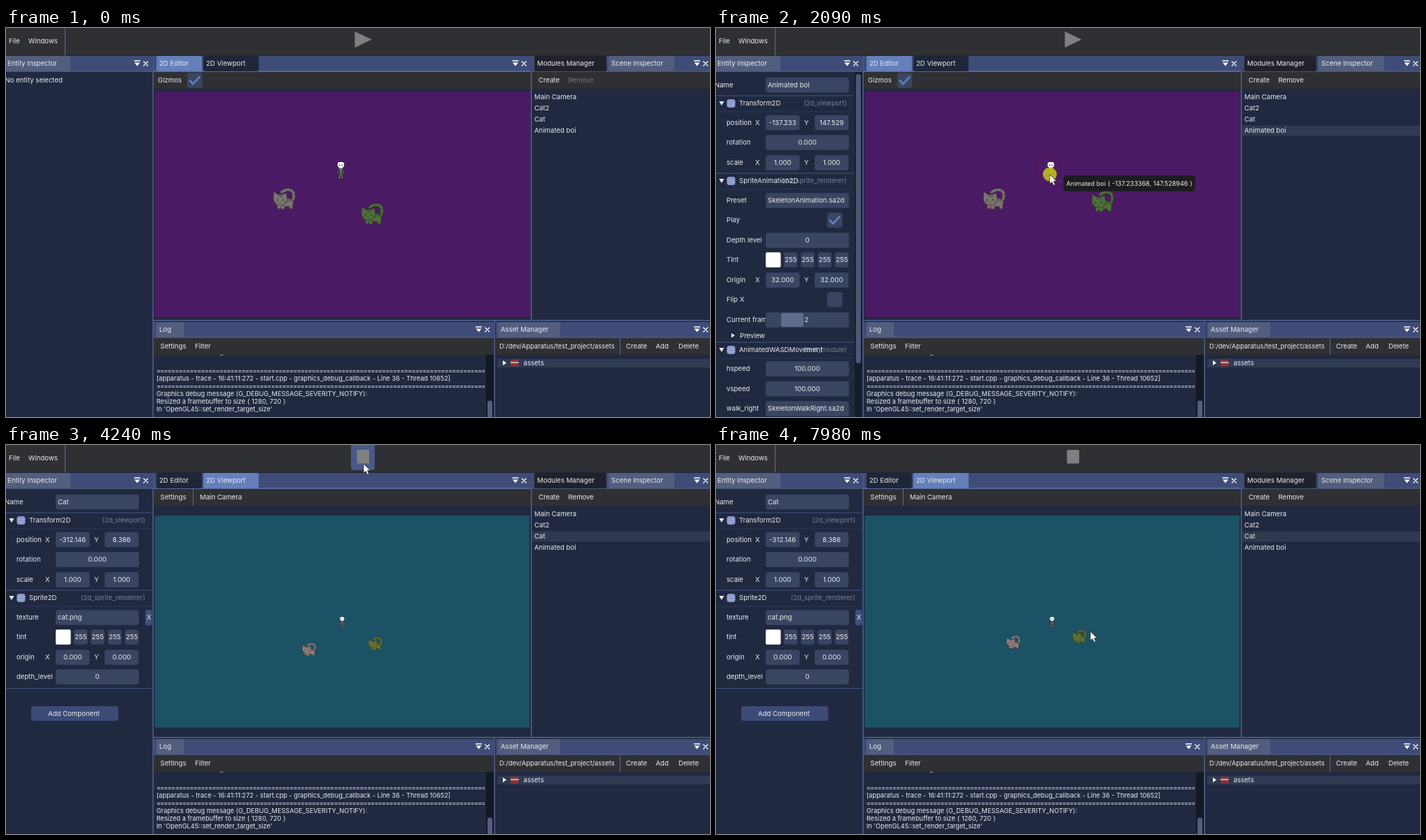
An HTML page that plays this animation: 1006x557 px, repeating every 8000 ms.

```html
<!DOCTYPE html>
<html lang="en">
<head>
<meta charset="utf-8">
<title>Scene editor</title>
<style>
  html, body { margin: 0; width: 100%; height: 100%; overflow: hidden; background: #202940; }
  svg { display: block; }
  text { font-family: Inter, "Open Sans", sans-serif; font-size: 9.6px; fill: #ececee; white-space: pre; }
</style>
</head>
<body>
<svg id="stage" width="1006" height="557" viewBox="0 0 1006 557"></svg>
<script>
const stage = document.getElementById('stage');
const C = {
  panel: '#202940', bar: '#2f3033', field: '#3a4562', tab: '#535e7e', focus: '#647fba',
  head: '#3f4c77', dark: '#1e2639', line: '#576b9b', rule: '#45557f', grey: '#77819a'
};

// ---- drawing helpers ----
function el(tag, parent, attrs = {}, content) {
  const e = document.createElementNS('http://www.w3.org/2000/svg', tag);
  for (const k in attrs) e.setAttribute(k, attrs[k]);
  if (content !== undefined) e.textContent = content;
  parent.appendChild(e);
  return e;
}
const group = p => el('g', p);
const rect = (p, x, y, width, height, fill, rx = 0) => el('rect', p, { x, y, width, height, fill, rx });
const path = (p, d, fill, stroke = 'none', w = 1) =>
  el('path', p, { d, fill, stroke, 'stroke-width': w, 'stroke-linecap': 'round', 'stroke-linejoin': 'round' });
const label = (p, x, y, s, attrs = {}) => el('text', p, { x, y: y + 3.4, ...attrs }, s);
const show = (e, on) => e.setAttribute('display', on ? 'inline' : 'none');
const place = (e, x, y, s = 1) => e.setAttribute('transform', `translate(${x} ${y}) scale(${s})`);

function field(p, x, y, w, s = '', left = false) {
  rect(p, x, y - 10.7, w, 21.5, C.field, 3.5);
  return left ? label(p, x + 3, y, s) : label(p, x + w / 2, y, s, { 'text-anchor': 'middle' });
}
function pair(p, y, a, b) {
  label(p, 56, y, 'X');
  label(p, 126, y, 'Y');
  return [field(p, 71, y, 48.5, a), field(p, 141, y, 48.5, b)];
}
function tint(p, y) {
  const swatch = rect(p, 71, y - 10.7, 21.5, 21.5, '#fff', 2);
  return [swatch, ...[97, 121.3, 145.7, 170].map(x => field(p, x, y, 19.5, '255'))];
}
function checkbox(p, x, y, on) {
  rect(p, x, y - 10.7, 21.5, 21.5, C.field, 3.5);
  if (on) path(p, `M${x + 4} ${y + .5}l4.3 4.7 9.2 -10`, 'none', C.focus, 2.7);
}
function section(p, y, name, module, right) {
  const w = right + 10;
  rect(p, 0, y - 11.5, w, 1, C.rule);
  rect(p, 0, y + 11.5, w, 1, '#2d3856');
  path(p, `M4.5 ${y - 3}h7l-3.5 6z`, '#ececee');
  rect(p, 15.5, y - 6, 12, 12, '#8999cc', 3.5);
  path(p, `M16.5 ${y - 2}q5 3 10 0M16.5 ${y + 1.5}q5 3 10 0`, 'none', '#b0bce3', .7);
  label(p, right, y, module, { 'text-anchor': 'end', style: 'fill:' + C.grey });
  label(p, 33, y, name);
}
function header(x, w, y, edge) {
  rect(stage, x, y, w, 22.5, C.head);
  rect(stage, x, y + 21.5, w, 1.2, edge);
  const r = x + w, m = y + 11;
  path(stage, `M${r - 25.5} ${m - 4}h8`, 'none', '#fff', 1.3);
  path(stage, `M${r - 25.5} ${m - 1.5}h8l-4 5z`, '#fff');
  path(stage, `M${r - 12.3} ${m - 3}l6 6m0 -6l-6 6`, 'none', '#fff', 1.3);
}
function tab(x, w, y, fill, s, pad = 4) {
  const r = rect(stage, x, y, w, 22, fill, 2.5);
  label(stage, x + pad, y + 11, s);
  return r;
}

function cat(p, fur, dark) {
  const g = group(p);
  const tail = 'M26 20C32.5 15 31 4 25 3C21 2.2 17 3 13 6';
  path(g, tail, 'none', dark, 4.6);
  path(g, tail, 'none', fur, 3.2);
  path(g, 'M9 16Q20 13 27 16.5Q30.5 19 29 24L28.5 30H24.5L23.5 26.5H17.5L16.5 30.5H12.5L11.5 27.5L10.5 30H7L6 24Z', fur, dark, .9);
  path(g, 'M2 5.5L7.5 9.5H13.5L19.5 7.5L21 17.5Q20 25 11 25Q2 24.5 1 16.5Z', fur, dark, .9);
  path(g, 'M9 10.5v2.5M11.5 10.5v3M14 10.5v2.5M23 16v3.5M26 17v3M21 4.5v-1.5M26 4l.8 -1.2M29.5 9h1.3M28.5 15l1.3 .6', 'none', dark, .8);
  rect(g, 5.5, 16, 1.8, 2.4, dark);
  rect(g, 14, 16, 1.8, 2.4, dark);
  path(g, 'M9.5 20.3l1.3 1 1.3 -1M2.5 20h2.5M17 20h2.5', 'none', dark, .7);
  return g;
}

// Centred on the body; one group per walking pose
function skeleton(p) {
  const g = group(p);
  const poses = [0, 1, -1].map(k => {
    const q = group(g);
    const legs = `M-1.4 5L${-1.6 - 1.6 * k} 11h-1M1.4 5L${1.6 - 1.6 * k} 11h1`;
    const arms = `M-3.2 -2L${-3.7 + k} 5M3.2 -2L${3.7 + k} 5`;
    path(q, legs + arms, 'none', '#1c1a20', 2.8);
    path(q, legs + arms, 'none', '#b9b9b5', 1);
    rect(q, -3.4, -3.5, 6.8, 9.5, '#1c1a20', 1.5);
    path(q, 'M-2 -1.8h4M-2 .4h4M-1.6 2.6h3.2M-1.6 4.8h3.2', 'none', '#c9c9c4', .9);
    rect(q, -4.7, -12, 9.4, 7.4, '#fff', 3);
    rect(q, -2.8, -5.2, 5.6, 2.2, '#e6e6e4', .8);
    rect(q, -2.6 + k, -8.3, 1.5, 1.6, '#3b3740');
    rect(q, 1.1 + k, -8.3, 1.5, 1.6, '#3b3740');
    return q;
  });
  g.pose = i => poses.forEach((q, n) => show(q, n === i));
  return g;
}

// ---- frame of the window ----
rect(stage, 0, 0, 1006, 557, C.panel);
rect(stage, 0, 0, 1006, 39, C.bar);
label(stage, 4, 19, 'File');
label(stage, 32, 19, 'Windows');
rect(stage, 84, 0, 1, 39, C.line);
rect(stage, 0, 39, 1006, 1, C.dark);

header(0, 209, 40, C.tab);
tab(-4, 96, 40, C.tab, 'Entity Inspector', 6);
header(211, 538.5, 40, C.focus);
const tabEdit = tab(215, 65, 40, C.focus, '2D Editor');
const tabView = tab(282, 79, 40, C.dark, '2D Viewport');
header(752, 257, 40, C.tab);
tab(755, 103, 40, '#1f222c', 'Modules Manager');
tab(861, 94, 40, C.tab, 'Scene Inspector');
header(211, 486, 421, C.tab);
tab(215, 39, 421, C.tab, 'Log');
header(700, 309, 421, C.tab);
tab(703, 89, 421, C.tab, 'Asset Manager');

for (const [x, y, w] of [[211, 63, 539], [752, 63, 254], [211, 444, 486], [700, 444, 306]])
  rect(stage, x, y, w, 24, C.bar);
for (const [x, y, w, h] of [[209.5, 40, 1.3, 517], [750, 40, 1.3, 379], [210, 418, 796, 1.3], [697.5, 418, 1.3, 139]])
  rect(stage, x, y, w, h, C.line);

// scene list
const entities = ['Main Camera', 'Cat2', 'Cat', 'Animated boi'];
label(stage, 761, 75, 'Create');
const remove = label(stage, 803.5, 75, 'Remove');
const picked = rect(stage, 752, 0, 254, 15, '#303950');
entities.forEach((s, i) => label(stage, 755, 99 + 16 * i, s));

// log
label(stage, 220.5, 456, 'Settings');
label(stage, 270, 456, 'Filter');
el('rect', el('clipPath', stage, { id: 'logArea' }), { x: 212, y: 468, width: 472, height: 89 });
const log = el('g', stage, { 'clip-path': 'url(#logArea)' });
const bar = '='.repeat(120);
[bar, '[apparatus - trace - 16:41:11:272 - start.cpp - graphics_debug_callback - Line 36 - Thread 10652]', bar,
  'Graphics debug message (G_DEBUG_MESSAGE_SEVERITY_NOTIFY):', 'Resized a framebuffer to size { 1280, 720 }',
  "In 'OpenGL45::set_render_target_size'"
].forEach((s, i) => label(log, 215, 490.5 + 11.1 * i, s, { style: 'font-size:9.2px;letter-spacing:' + (s === bar ? '-.8px' : 0) }));
rect(log, 306, 468, 4, 1, '#aaa');
rect(stage, 686, 468, 11, 89, '#141822');
rect(stage, 688, 533.5, 7, 30, C.tab, 3);

// assets
label(stage, 705, 456, 'D:/dev/Apparatus/test_project/assets', { style: 'font-size:9.4px' });
rect(stage, 877, 444, 1, 24, C.line);
label(stage, 886, 456, 'Create');
label(stage, 928.5, 456, 'Add');
label(stage, 961, 456, 'Delete');
rect(stage, 702, 473.5, 304, 12.5, '#303a53');
path(stage, 'M710 476l5 3.5 -5 3.5z', '#fff');
rect(stage, 721, 475, 11.5, 9.5, '#8d3338', 1);
rect(stage, 721, 478.3, 11.5, 1.6, '#d9c9c7');
label(stage, 739.5, 480, 'assets');

// ---- inspector ----
const empty = label(stage, -1.5, 75, 'No entity selected');
const info = group(stage);
label(info, -2, 82, 'Name');
const nameField = field(info, 71, 81.7, 119, '', true);

const spriteBox = group(info);
section(spriteBox, 108, 'Transform2D', '(2d_viewport)', 199);
section(spriteBox, 219, 'Sprite2D', '(2d_sprite_renderer)', 199);
label(spriteBox, 15, 247, 'texture');
field(spriteBox, 71, 247, 119, 'cat.png', true);
rect(spriteBox, 199, 236, 9.5, 22, '#3e4f80', 2);
label(spriteBox, 201, 247, 'X');
label(spriteBox, 15, 275, 'tint');
const spriteTint = tint(spriteBox, 275);
label(spriteBox, 15, 304, 'origin');
pair(spriteBox, 304, '0.000', '0.000');
label(spriteBox, 15, 332, 'depth_level');
const depth = field(spriteBox, 71, 332, 119);
rect(spriteBox, 0, 348, 209, 1, C.rule);
rect(spriteBox, 36, 374, 124.5, 21, '#3c4a77', 3);
label(spriteBox, 97, 385, 'Add Component', { 'text-anchor': 'middle' });

const animBox = group(info);
section(animBox, 108, 'Transform2D', '(2d_viewport)', 187);
section(animBox, 219, 'SpriteAnimation2D', '(2d_sprite_renderer)', 187);
[['Preset', 247], ['Play', 275], ['Depth level', 304], ['Tint', 332], ['Origin', 361], ['Flip X', 389],
  ['Current frame', 418], ['hspeed', 488], ['vspeed', 516.5], ['walk_right', 545]]
  .forEach(([s, y]) => label(animBox, 15, y, s));
field(animBox, 71, 247, 119, 'SkeletonAnimation.sa2d', true);
checkbox(animBox, 159, 275, true);
field(animBox, 71, 304, 119, '0');
tint(animBox, 332);
pair(animBox, 361, '32.000', '32.000');
checkbox(animBox, 159, 389, false);
field(animBox, 71, 418, 119);
rect(animBox, 93, 408, 32, 20, '#616c8b', 3);
label(animBox, 129.5, 418, '2', { 'text-anchor': 'middle' });
path(animBox, 'M22 437l5 3.3 -5 3.3z', '#ececee');
label(animBox, 34, 440.5, 'Preview');
section(animBox, 461, 'AnimatedWASDMovement', '(test_module)', 187);
field(animBox, 71, 488, 119, '100.000');
field(animBox, 71, 516.5, 119, '100.000');
field(animBox, 71, 545, 119, 'SkeletonWalkRight.sa2d', true);
rect(animBox, 198.5, 63, 10, 494, '#161b28');
rect(animBox, 200, 66, 7, 414, '#4e5873', 3);

const posFields = pair(info, 135.5, '', '');
pair(info, 193, '1.000', '1.000');
field(info, 71, 164, 119, '0.000');
[['position', 135.5], ['rotation', 164], ['scale', 193]].forEach(([s, y]) => label(info, 15, y, s));

// ---- editor and viewport ----
const editor = group(stage);
label(editor, 217, 75, 'Gizmos');
checkbox(editor, 259, 75, true);
rect(editor, 212.5, 90.5, 537, 323.5, '#4b1a64');
const edBoi = skeleton(editor);
const edCat = cat(editor, '#7b7571', '#453a42');
const edCat2 = cat(editor, '#4f7039', '#2c3d28');
const outline = el('rect', editor, { fill: 'none', stroke: '#a31c3b', 'stroke-width': 1 });

const view = group(stage);
label(view, 220.5, 75, 'Settings');
rect(view, 267, 63, 1, 24, C.line);
label(view, 277, 75, 'Main Camera');
rect(view, 212.5, 101, 535.5, 303.5, '#1b5265');
const vwBoi = skeleton(view);
const vwCat = cat(view, '#96807d', '#40383d');
const vwCat2 = cat(view, '#6c7431', '#333a1d');
place(vwBoi, 480.3, 254, .64);

// play button
const glow = rect(stage, 493, -4, 34, 40, '#48598a', 4);
const play = path(stage, 'M498.5 5L522.5 16.5L498.5 28Z', '#808080');
const stop = rect(stage, 501.5, 7, 17.5, 19.5, '#808080', 1);

// pointer
const tip = group(stage);
const tipBox = rect(tip, 0, 0, 0, 22.5, '#1d1d20', 3.5);
const tipText = label(tip, 4, 11.5, '', { style: 'font-size:9.1px' });
const press = el('circle', stage, { r: 10, fill: '#c5c41f', opacity: .85 });
const pointer = path(stage, 'M0 0V13.2L3 10.4L5.3 15.3L7.6 14.2L5.4 9.5H9.3Z', '#fff', '#222', .7);

// ---- timeline ----
const LOOP = 8000, UNIT = 1.9387;
const runs = [[210, 910, 10], [1070, 1230, 3], [1380, 2160, 11], [2240, 3010, 11], [3080, 3860, 11], [4020, 4100, 2],
  [4240, 4780, 8], [5170, 5490, 5], [5950, 6180, 4], [6730, 7500, 11], [7580, 7980, 6]];
const steps = [0];
for (const [a, b, n] of runs)
  for (let i = 0; i < n; i++) steps.push(Math.round((a + (b - a) * i / (n - 1)) / 10) * 10);

// drags as [time, dx, dy]
const drag = {
  'Cat2': [[910, 0, 0], [1070, 35, -6], [1150, 66, 2], [1230, 50, -10], [1460, 29, -18]],
  'Animated boi': [[2090, 0, 0], [2320, 14, -22], [2480, -3, -4.4995]],
  'Cat': [[3010, 0, 0], [3160, 26, 10], [3240, 32, 20], [3320, 16, 23], [3480, 1.5, 16.4976]]
};
const home = { 'Cat2': [-84.880005, -0.629547], 'Animated boi': [-137.233368, 147.528946], 'Cat': [-315.053894, 40.369919] };
const corner = { 'Cat2': [507, 250.5], 'Animated boi': [461, 184], 'Cat': [381, 229] };
const shift = (keys, x, y) => keys.map(([t, a, b]) => [t, a + x, b + y]);
const route = [[210, 566, 514], [830, 528, 276], ...shift(drag['Cat2'], 528, 276), [1930, 477, 210],
  ...shift(drag['Animated boi'], 477, 210), [2930, 397, 235], ...shift(drag['Cat'], 397, 235),
  [3860, 511, 27], [4240, 511, 27], [4780, 546, 268], [5090, 546, 268], [5250, 535, 267]];
const walk = [[5090, 0, 0], [5490, -15, 0], [5950, -15, 5], [6030, -14, 15], [6180, -10, 4], [6730, -10, 0],
  [6890, -2, 15], [7190, 1, -2], [7350, 1, -10], [7500, -6, -10], [7660, 1, -10], [7820, -3, -10.3], [7980, -8.5, -10.3]];

function at(keys, t) {
  const i = keys.findIndex(k => k[0] > t);
  if (i === 0) return keys[0].slice(1);
  if (i < 0) return keys[keys.length - 1].slice(1);
  const [t0, x0, y0] = keys[i - 1], [t1, x1, y1] = keys[i];
  const u = (t - t0) / (t1 - t0);
  return [x0 + (x1 - x0) * u, y0 + (y1 - y0) * u];
}
function world(who, t) {
  const [dx, dy] = at(drag[who], t);
  return [home[who][0] + dx * UNIT, home[who][1] - dy * UNIT];
}
function spot(who, t) {
  const [dx, dy] = at(drag[who], t);
  return [corner[who][0] + dx, corner[who][1] + dy];
}
const within = (t, ...spans) => spans.some(([a, b]) => t >= a && t <= b);

function draw(t) {
  const who = t < 830 ? '' : t < 2000 ? 'Cat2' : t < 3010 ? 'Animated boi' : 'Cat';
  const boi = who === 'Animated boi', green = who === 'Cat2';
  const running = t >= 4240;

  // inspector and list
  show(empty, !who);
  show(info, who);
  show(picked, who);
  show(spriteBox, !boi);
  show(animBox, boi);
  remove.style.fill = who ? '' : '#747578';
  if (who) {
    picked.setAttribute('y', 91.5 + 16 * entities.indexOf(who));
    nameField.textContent = who;
    world(who, t).forEach((v, i) => posFields[i].textContent = v.toFixed(3));
    spriteTint[0].setAttribute('fill', green ? '#b0eb93' : '#fff');
    [176, 235, 147, 255].forEach((v, i) => spriteTint[i + 1].textContent = green ? v : 255);
    depth.textContent = green ? 5 : 0;
  }

  // editor
  show(editor, !running);
  place(edCat2, ...spot('Cat2', t));
  place(edCat, ...spot('Cat', t));
  const [bx, by] = spot('Animated boi', t);
  place(edBoi, bx + 17.5, by + 20);
  const tick = Math.floor(t / 80);
  edBoi.pose(boi ? (tick + 1) % 3 : 0);
  show(outline, who);
  if (who) {
    const [x, y] = spot(who, t), size = boi ? 35 : 31.5;
    const pulse = .62 + .38 * Math.cos((t - 910) / 2340 * 2 * Math.PI);
    for (const [k, v] of Object.entries({ x, y, width: size, height: size, opacity: pulse }))
      outline.setAttribute(k, v);
  }

  // viewport
  show(view, running);
  const [wx, wy] = at(walk, t);
  place(vwCat, 423 + wx, 283 + wy, .62);
  place(vwCat2, 517.5 + wx, 274.8 + wy, .62);
  vwBoi.pose(tick % 3);

  // tabs and play button
  const [x, y] = at(route, t);
  tabEdit.setAttribute('fill', t < 4100 ? C.focus : C.dark);
  tabView.setAttribute('fill', t < 4100 ? C.dark : C.focus);
  show(play, t < 4100);
  show(stop, t >= 4100);
  show(glow, t > 3000 && y < 36 && x > 493 && x < 527);

  // pointer, press mark, tooltip
  show(pointer, t >= 210);
  place(pointer, x, y);
  show(press, within(t, [830, 1460], [2000, 2480], [3010, 3480], [4020, 4090]));
  place(press, x, y - .5);
  const over = within(t, [750, 1460]) ? 'Cat2' : within(t, [1930, 2480]) ? 'Animated boi' : within(t, [2930, 3480]) ? 'Cat' : '';
  show(tip, over);
  if (over) {
    tipText.textContent = `${over} { ${world(over, t).map(v => v.toFixed(6)).join(', ')} }`;
    tipBox.setAttribute('width', tipText.getComputedTextLength() + 8);
    tip.setAttribute('opacity', within(t, [750, 829], [1930, 1999], [2930, 3009]) ? .55 : 1);
    place(tip, x + 19.5, y + 1.3);
  }
}

const begin = performance.now();
let last = -1;
function loop() {
  const t = (performance.now() - begin) % LOOP;
  const now = steps.filter(s => s <= t).pop();
  if (now !== last) draw(last = now);
  requestAnimationFrame(loop);
}
loop();
</script>
</body>
</html>
```
